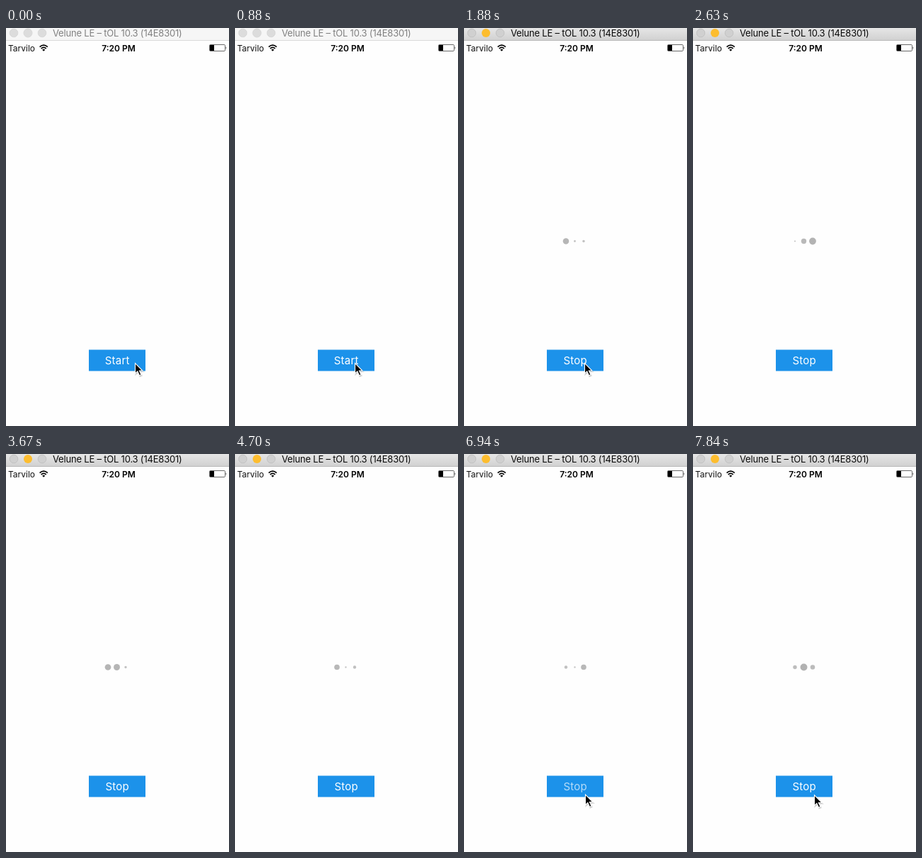
An HTML page that plays this animation: 315x561 px, repeating every 7990 ms.

```html
<!DOCTYPE html>
<html lang="en">
<head>
<meta charset="utf-8">
<title>Loading button</title>
<style>
  html, body { margin: 0; width: 100%; height: 100%; overflow: hidden; background: #fefefe; }
  svg { display: block; width: 100vw; height: 100vh; }
  text { font-family: Inter, Roboto, sans-serif; }
</style>
</head>
<body>
<svg viewBox="0 0 315 561" xmlns="http://www.w3.org/2000/svg">
  <defs>
    <linearGradient id="active" x1="0" y1="0" x2="0" y2="1">
      <stop offset="0" stop-color="#e6e6e6"/>
      <stop offset="1" stop-color="#d1d1d1"/>
    </linearGradient>
    <path id="arrow" d="M0 0V14.5L3.3 11.4L6 17.3L8.5 16.2L5.9 10.5H10.4Z"/>
  </defs>
  <rect width="315" height="561" fill="#fefefe"/>

  <rect id="bar" width="315" height="17"/>
  <rect id="edge" y="17" width="315" height="1"/>
  <g id="lights">
    <circle cx="11" cy="7" r="5.8"/>
    <circle id="amber" cx="31" cy="7" r="6"/>
    <circle cx="51" cy="7" r="5.8"/>
  </g>
  <text id="title" x="66" y="12" font-size="13" letter-spacing="-.2">Velune LE – tOL 10.3 (14E8301)</text>

  <text x="3" y="32.5" font-size="12" fill="#111">Tarvilo</text>
  <g fill="none" stroke="#000" stroke-width="1.7">
    <path d="M47.6 26.7Q53.2 21.6 58.8 26.7"/>
    <path d="M49.7 29Q53.2 25.9 56.7 29"/>
  </g>
  <path d="M51.2 30.7Q53.2 29 55.2 30.7L53.2 32.8Z"/>
  <text x="159" y="32.5" font-size="12" font-weight="600" text-anchor="middle">7:20 PM</text>
  <rect x="287.5" y="23.5" width="22" height="9" rx="1.3" fill="none" stroke="#444" stroke-width=".8"/>
  <rect x="288" y="24" width="6" height="8"/>
  <path d="M310.6 26.5Q312.4 28 310.6 29.5Z"/>

  <g id="dots"></g>

  <rect x="117" y="453.5" width="80" height="30" fill="#1c92ea"/>
  <text id="label" x="157.2" y="474" font-size="15" letter-spacing=".2" text-anchor="middle" fill="#fff"></text>

  <g id="cursor">
    <use href="#arrow" x=".7" y="1.3" fill-opacity=".18" stroke="#000" stroke-opacity=".12" stroke-width="2"/>
    <use href="#arrow" stroke="#fff" stroke-width="1.1"/>
  </g>
</svg>
<script>
const LOOP = 7990, STEP = 148.2;
const TAPS = [1290, 5720, 6740];

// Pointer trips through a few points [time, x, y]; hidden between trips.
const TRIPS = [
  [[0, 182.5, 472.5], [300, 164, 464], [590, 169.5, 472.5], [1740, 170.5, 472.5], [2200, 174, 533]],
  [[5140, 171, 529], [5580, 166.5, 476.5], [5900, 166.5, 476.5], [6270, 171, 490],
   [6640, 171.5, 480], [LOOP, 171.5, 481]]
];

const $ = id => document.getElementById(id);
const set = (el, attrs) => { for (const k in attrs) el.setAttribute(k, attrs[k]); };
const show = (el, on) => set(el, { visibility: on ? "visible" : "hidden" });
const mix = (a, b, f) => a + (b - a) * f;
const ease = f => f * f * (3 - 2 * f);

const dots = [0, 1, 2].map(i => {
  const dot = document.createElementNS("http://www.w3.org/2000/svg", "circle");
  set(dot, { cx: 144 + 12.5 * i, cy: 300.5 });
  return $("dots").appendChild(dot);
});

// The picture moves in even steps, restarted by the first tap.
function hold(t) {
  const start = t < TAPS[0] ? 0 : TAPS[0];
  return start + Math.floor((t - start) / STEP) * STEP;
}

function along(keys, t) {
  const i = Math.max(1, keys.findIndex(k => k[0] >= t));
  const [a, b] = [keys[i - 1], keys[i]];
  const f = ease((t - a[0]) / (b[0] - a[0]));
  return [mix(a[1], b[1], f), mix(a[2], b[2], f)];
}

function drawWindow(active) {
  set($("bar"), { fill: active ? "url(#active)" : "#f6f6f6" });
  set($("edge"), { fill: active ? "#b9b9b9" : "#dadada" });
  set($("lights"), { fill: active ? "#d0d0d0" : "#dcdcdc", stroke: active ? "#c2c2c2" : "#d8d8d8" });
  set($("amber"), { fill: active ? "#fdbd2e" : "#dcdcdc", stroke: active ? "none" : "#d8d8d8" });
  set($("title"), { fill: active ? "#0a0a0a" : "#808080" });
}

function drawButton(taps, age) {
  const shown = age < 100 ? taps - 1 : taps;
  $("label").textContent = shown % 2 ? "Stop" : "Start";
  set($("label"), { "fill-opacity": Math.min(1, .06 + age * .0034) });
}

function drawDots(taps, age) {
  const busy = taps % 2;
  show($("dots"), busy);
  if (!busy) return;
  dots.forEach((dot, i) => {
    const wave = Math.cos((203 + .238 * age - 90 * i) * Math.PI / 180);
    const grey = Math.round(188 - 10 * wave);
    set(dot, { r: 3 + 2 * wave, fill: `rgb(${grey},${grey},${grey})` });
  });
}

function drawCursor(t) {
  const trip = TRIPS.find(k => t >= k[0][0] && t <= k[k.length - 1][0]);
  show($("cursor"), trip);
  if (trip) set($("cursor"), { transform: `translate(${along(trip, t)})` });
}

function draw(time) {
  const t = hold(time % LOOP);
  const taps = TAPS.filter(x => x <= t).length;
  const age = taps ? t - TAPS[taps - 1] : Infinity;
  drawWindow(taps > 0);
  drawButton(taps, age);
  drawDots(taps, age);
  drawCursor(t);
}

const begin = performance.now();
function tick() {
  draw(performance.now() - begin);
  requestAnimationFrame(tick);
}
tick();
</script>
</body>
</html>
```
